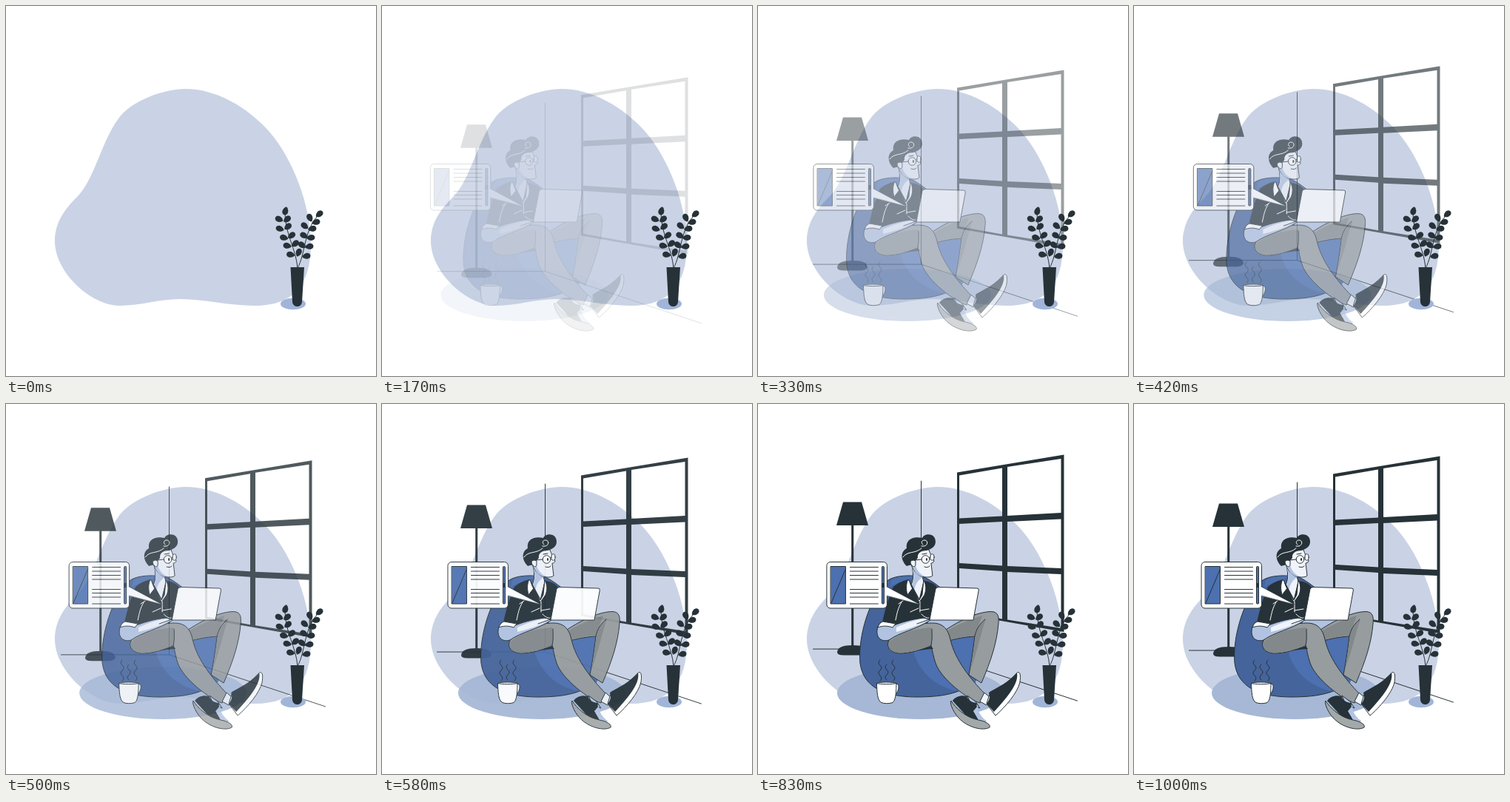
An HTML page that plays this animation: 500 by 500 pixels, repeating every 1040 ms.

```html
<!DOCTYPE html>
<html lang="en">
<head>
<meta charset="utf-8">
<title>Reading at home</title>
<style>
  html, body { margin: 0; width: 100%; height: 100%; overflow: hidden; background: #fff; }
  svg { display: block; width: 100vw; height: 100vh; }
  .ink { fill: #263238; }
  .line { fill: none; stroke: #263238; stroke-linecap: round; stroke-linejoin: round; }
  .chalk { fill: none; stroke: #fff; stroke-linecap: round; }
  .edge { stroke: #263238; stroke-linejoin: round; }
  .skin { fill: #f0f3f9; }
  .tint { fill: #b2c3e2; }
  .blue { fill: #4c70b0; }
  .cloth { fill: #979c9e; }
  .fold { fill: #83888a; }
  .paper { fill: #fff; }
</style>
</head>
<body>
<svg viewBox="0 0 500 500">
  <path fill="#cad3e5" d="M243 112C282 112 325 135 356 170C388 207 412 270 412 322C412 375 390 405 336 405C300 405 268 396 235 396C207 396 182 405 154 405C115 405 66 360 66 318C66 290 82 272 97 257C120 233 128 185 152 152C168 129 212 112 243 112Z"/>

  <!-- room -->
  <g class="rise">
    <path class="line" d="M74.500 331H220.500L431.500 401M220.500 104V331"/>
    <path class="ink" fill-rule="evenodd" d="M269 92.500L413.500 68.500V308L269 282.500Z
      M272 96.500L330 86.500V151.500L272 154.500Z M337 85L409.500 74V147L337 151Z
      M272 162L330 159V218.500L272 215Z M337 159L409.500 155.500V222L337 219Z
      M272 222L330 226V290.500L272 280Z M337 227L409.500 230V303L337 291.500Z"/>
  </g>
  <g class="rise ink">
    <path d="M115 132.500H140L149 164H106ZM126.200 164H129.200V327H126.200Z"/>
    <path d="M107 335C108 329 114 326 128 326S147 329 148 335C147 338 143 339.500 138 339.500H117C112 339.500 107 339 107 335Z"/>
  </g>

  <ellipse class="slide" cx="220" cy="390.500" rx="113" ry="35.500" fill="#a6b8d6"/>

  <g class="slide">
    <!-- bean bag -->
    <path class="edge" fill="#45649b" d="M176 238C185 232 205 230 225 234C262 252 300 305 303 340C304 385 265 396 215 396C170 396 142 382 138 350C135 315 150 262 176 238Z"/>
    <path class="blue" d="M180 238C186 233 198 232 212 233L204 238C192 240 185 243 178 248ZM210 334C216 356 236 386 280 389C300 379 302 355 302 340C299 326 291 309 283 300L236 310Z"/>

    <!-- reader -->
    <path class="tint" d="M228 291H300L282 314L240 322Z"/>
    <path class="cloth edge" d="M236 318C256 302 290 281 315 280.500C325 280.500 326 288 325 297C323 322 315 347 302 377L285 366C289 345 291 330 293 314C277 315 265 318 258 320Z"/>
    <path class="fold" d="M238 318C258 303 285 291 303 286L293 313C277 314 265 317 258 319ZM308 291C303 303 299 326 287 360C290 344 292 328 294 313C297 303 302 296 308 291Z"/>
    <path class="line" d="M293 314C295 304 300 297 307 291"/>

    <path class="skin edge" d="M208 218C211 232 210 243 204 248L218 268L224 240L222 233Z"/>
    <path class="tint" d="M208 220C212 232 211 242 206 248L211 254C212 244 216 238 223 234Z"/>

    <path class="ink" d="M183 247C190 241 198 238 204 237L218 263L224 239C234 240 242 244 243 251L235 291L190 299L168 295C172 277 177 260 183 247Z"/>
    <path class="paper edge" d="M203 237C200 243 200 250 202 258L209 249L218 268L225 258C228 250 227 244 224 238L222 258L218 265C213 257 207 248 205 240Z"/>
    <path class="chalk" d="M194 268C189 276 188 283 186 292M190 270L196 266M219 267V281M206 281L217 276M219 279L231 277M221 284C225 288 229 290 231 289"/>

    <path class="cloth edge" d="M176 322C181 309 207 296 236 296C250 296 257 304 260 318C266 346 288 372 306 391L300 404C283 399 247 371 240 350C237 341 236 334 234 326C223 332 206 337 191 337C180 336 174 330 176 322Z"/>
    <path class="fold" d="M177 322C188 311 208 304 234 302C236 310 236 318 234 326C223 331 206 336.500 191 336.500C180 335.500 175 330 177 322Z"/>
    <path class="line" d="M234 326C236 317 235 309 235 304"/>
    <path class="ink" d="M215 333C226 330 232 328 234 327L237 331C229 331 221 333 215 333Z"/>

    <path class="tint edge" d="M162 301C158 316 167 322 177 319C192 308 214 305 233 292L224 289C206 291 192 296 184 299L166 295Z"/>
    <path class="paper edge" d="M162 302C164 297 166 295 169 294L186 297L182 302C174 299 167 300 162 302Z"/>
    <path class="skin" d="M187 302C200 296 213 291 226 290L231 292C216 300 203 304 187 308Z"/>
    <path class="line" d="M215 297L232 291"/>
    <path class="paper edge" d="M245 247.500L296 249Q299 249 298.300 252L291 292H232L240 250Q241 247.500 245 247.500Z"/>

    <!-- head -->
    <path class="skin edge" d="M209 203C217 197 226 196 231 197C233 202 234 206 238 212C237 215 235 215 234 215L236 232C233 235 225 234 221 233C214 230 210 224 208 219Z"/>
    <path class="tint" d="M210 216L213 214V218C215 225 219 230 226 233C216 234 211 226 209 219Z"/>
    <path class="ink" d="M201 219C193 211 192 200 201 195C199 183 210 178 222 181C225 174 240 174 240 186C240 194 233 196 228 198C220 198 215 202 216 208L212 213V219C208 217 205 218 201 219Z"/>
    <path class="chalk" d="M196 207C202 198 212 203 221 195M221 192C230 194 231 184 225 184C221 184 220 188 223 190"/>
    <path class="skin edge" d="M213 212C207 209 204 214 208 218C210 221 213 220 213 217Z"/>
    <g class="line">
      <circle cx="226.500" cy="210" r="5.300" fill="#fff"/>
      <ellipse cx="235.500" cy="207" rx="2.600" ry="4.300" fill="#fff"/>
      <path d="M212 211L221 210M231.500 208L233 207M222 203L228 202M225 220C228 221 230 221 232 219"/>
    </g>
    <ellipse class="ink" cx="228" cy="210" rx="1.100" ry="1.900"/>

    <!-- shoes -->
    <path class="skin edge" d="M300 402L306 390L314 397L309 407Z"/>
    <path class="paper edge" d="M309 405L321 421C334 410 351 390 354 376C355 368 355 362 351 362.500C340 374 325 386 314 389Z"/>
    <path class="ink" d="M309 405C313 400 314 395 312 390C323 383 341 375 350 363C352 373 347 386 319 416Z"/>
    <path class="tint edge" d="M283 394L294 402L300 411L288 406Z"/>
    <path class="ink" d="M263 401C267 395 275 393 282 395C285 402 292 404 296 404C294 414 300 422 309 429L284 424Z"/>
    <path class="tint" d="M291 415L297 408C297 416 302 423 309 429L298 427Z"/>
    <path class="edge" fill="#a3a8a9" d="M261 401C266 410 281 424 298 427C309 429 315 434 313 437C305 442 284 438 271 424C262 414 259 402 261 401Z"/>

    <!-- speech bubble -->
    <rect class="paper edge" x="93" y="213.500" width="81.500" height="62.500" rx="5"/>
    <path class="paper" d="M173 246.500L219 271L171 258.500Z"/>
    <path class="line" stroke-width=".6" d="M174.500 247L219 271L174.500 259"/>
    <path class="blue" d="M98.500 219.500H118.500V270H98.500Z"/>
    <path class="line" d="M98.500 219.500H118.500V270H98.500ZM118.500 223L99 269M124.500 220.500H162.500M124.500 226H162.500M124.500 231.500H162.500M124.500 237H162.500M124.500 250.500H162.500M124.500 255.500H162.500M124.500 261H162.500M124.500 270H162.500"/>
    <rect class="blue edge" x="167.500" y="219.500" width="3" height="50.500" rx="1"/>
    <rect class="ink" x="167" y="242" width="4" height="6"/>

    <!-- mug -->
    <path class="line" id="steam"/>
    <path class="paper edge" d="M186 379C192 376 191 388 185.500 393Z"/>
    <path class="paper edge" d="M160.500 377.500C162 375.500 185 375.500 187 377.500C187 390 186 404 180 404C177 405 170 405 167 403.500C161 401 161 388 160.500 377.500Z"/>
    <path class="line" d="M160.500 377.500C165 379 182 379 187 377.500"/>
  </g>

  <!-- plant -->
  <ellipse cx="388" cy="402.500" rx="17" ry="7.800" fill="#a1b5d8"/>
  <path class="line" d="M394 354C392 328 377 308 377 280M394 354C405 336 402 300 424 281"/>
  <g class="ink">
    <path d="M384.500 353H403L400 400C399 408 388 408 387 400Z"/>
    <g id="leaves"></g>
  </g>
</svg>
<script>
const FRAME = 1000 / 24, STEPS = 24, LEAD = .8, LOOP = 1040;
const TRAVEL = 30, REST = 32;
const rising = document.querySelectorAll('.rise');
const sliding = document.querySelectorAll('.slide');

// x, y, angle of each leaf
const leaves = [
  [377.5, 277, -75], [369, 288, 25], [380, 288, 140], [370, 301, 20], [381, 298, 140],
  [375.5, 313, 15], [386, 310, 145], [380, 324, 10], [391, 321, 140], [384.5, 336, 10], [395.5, 333, 110],
  [423.5, 281, 140], [410.5, 286, 65], [419, 292, 165], [403.5, 297, 40], [414, 301, 170],
  [402.5, 310, 30], [412, 313, 175], [400, 323, 35], [410, 325, 170], [406, 338, 170]
];
document.getElementById('leaves').innerHTML = leaves.map(([x, y, angle]) =>
  `<path transform="translate(${x} ${y}) rotate(${angle})" d="M-5.500 0C-5 -5.500 3 -5 6 0C3 5 -5 5.500 -5.500 0Z"/>`).join('');

const wisp = (x, y, waves) => `M${x} ${y}q-4 3.500 0 7` + 't0 7'.repeat(waves - 1);
document.getElementById('steam').setAttribute('d', wisp(165, 346, 4) + wisp(174, 352, 3) + wisp(183, 346, 4));

const bezier = (a, b, s) => 3 * (1 - s) ** 2 * s * a + 3 * (1 - s) * s * s * b + s ** 3;

// Cubic easing that overshoots, then settles.
function ease(progress) {
  let low = 0, high = 1;
  for (let i = 0; i < 24; i++) {
    const mid = (low + high) / 2;
    if (bezier(.36, .5, mid) < progress) low = mid; else high = mid;
  }
  return bezier(-.01, 1.38, (low + high) / 2);
}

function draw(time) {
  const step = Math.floor((time % LOOP + 6) / FRAME);
  const eased = ease(Math.min(1, (step + LEAD) / STEPS));
  const shift = TRAVEL * eased - REST;
  const opacity = step < 2 ? 0 : Math.min(1, eased);
  const place = (parts, x, y) => parts.forEach(part => {
    part.setAttribute('transform', `translate(${x} ${y})`);
    part.setAttribute('opacity', opacity);
  });
  place(rising, 0, -shift);
  place(sliding, shift, 0);
}

const start = performance.now();
function tick() {
  draw(performance.now() - start);
  requestAnimationFrame(tick);
}
tick();
</script>
</body>
</html>
```
